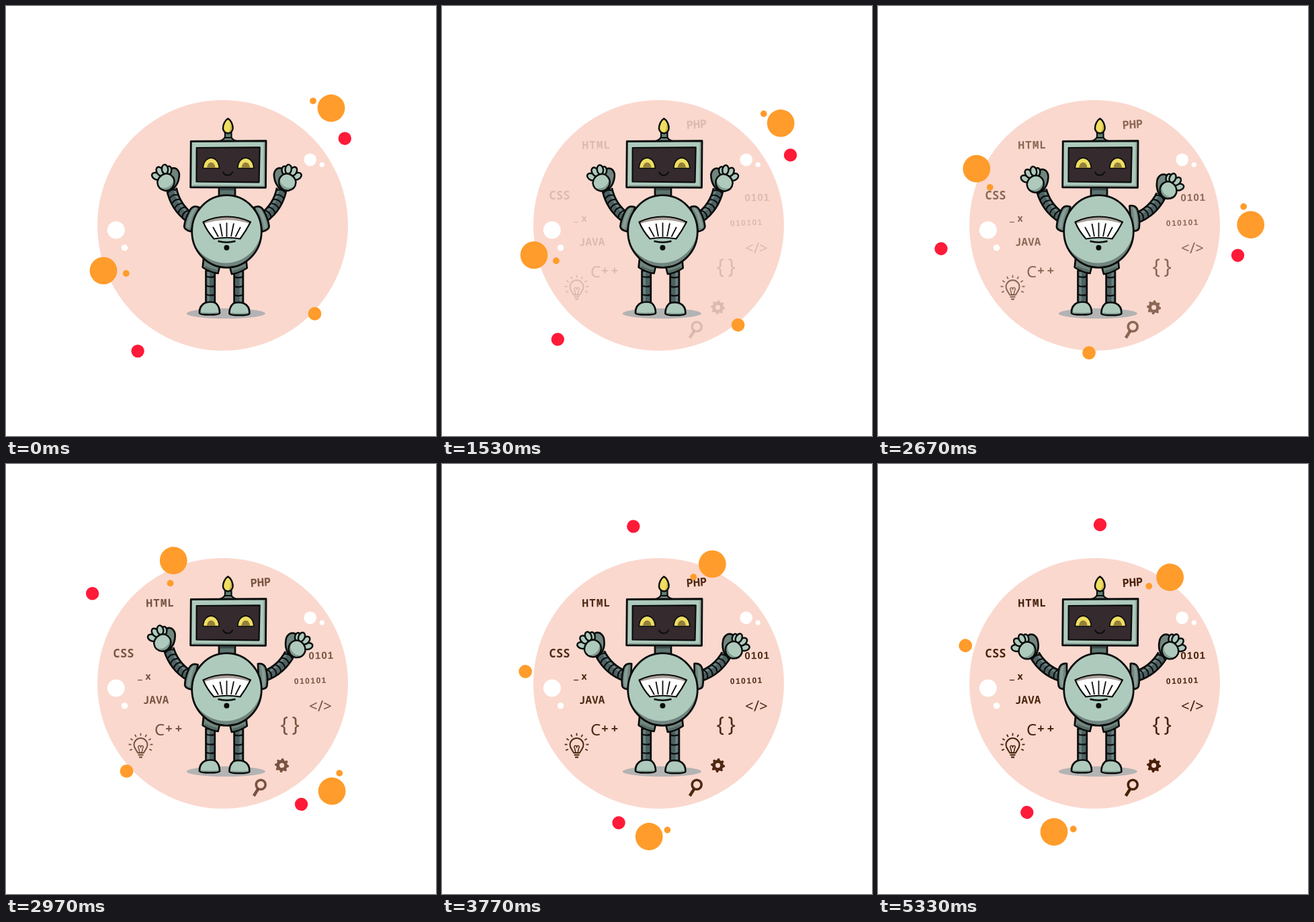
An HTML page with a canvas that plays this animation: 640 by 640 pixels, repeating every 6.01 s.

```html
<!DOCTYPE html>
<html lang="en">
<head>
<meta charset="utf-8">
<title>Waving robot</title>
<style>
html, body { margin: 0; width: 100%; height: 100%; overflow: hidden; background: #fff; }
canvas { display: block; width: 640px; height: 640px; }
</style>
</head>
<body>
<canvas id="stage" width="640" height="640"></canvas>
<script>
const ctx = document.getElementById('stage').getContext('2d');
const LOOP = 6010, END = 5330, TAU = Math.PI * 2, RAD = Math.PI / 180;
const INK = '#0b0d0c', MINT = '#aecabd', SHADE = '#71857f', SLATE = '#4d6163';
const ORANGE = '#ff9c2b', RED = '#ff1a38', BROWN = '#48200a', YELLOW = '#f0de62';

// Orbiting dots at rest: x, y, radius, colour
const DOTS = [
  [484, 152, 20.4, ORANGE], [457, 141.3, 4.9, ORANGE], [504.3, 197.2, 9.7, RED],
  [145, 393.8, 20.4, ORANGE], [178.8, 398, 4.9, ORANGE], [196.1, 513.6, 9.7, RED],
  [459.5, 458, 9.9, ORANGE]
];

// Words: text, left edge, baseline, font, letter spacing, tilt in degrees
const WORDS = [
  ['HTML', 208.5, 212.8, '600 16px "Noto Sans Mono", monospace', 1.1, -1],
  ['PHP', 364, 183.2, '600 17px "Noto Sans Mono", monospace', 0, -4],
  ['CSS', 159.5, 287.8, '600 17px "Noto Sans Mono", monospace', 0.2, 0],
  ['JAVA', 204, 357, '600 16px "Noto Sans Mono", monospace', 0, -1],
  ['0101', 450.5, 290.4, 'bold 15px "Liberation Sans", sans-serif', 1.1, -1],
  ['010101', 429, 327.5, 'bold 12px "Liberation Sans", sans-serif', 1.5, -2],
  ['C', 221, 403.8, '24px "Noto Sans", sans-serif', 0, 0],
  ['++', 237.2, 399.5, '600 18px "Noto Sans", sans-serif', 4.2, 0],
  ['_', 196, 319, '600 17px "Noto Sans", sans-serif', 0, 0],
  ['x', 207.5, 320.6, '700 14px "Noto Sans", sans-serif', 0, 0],
  ['</>', 451, 367.5, '500 22px "Noto Sans", sans-serif', 0.3, 0],
  ['{', 408.5, 397.5, '30px "Noto Sans", sans-serif', 0, 0],
  ['}', 425.5, 397.5, '30px "Noto Sans", sans-serif', 0, 0]
];

const clamp = v => Math.min(1, Math.max(0, v));
const smooth = s => s * s * (3 - 2 * s);

// Ease with control points (x1, 0) and (x2, 1)
function ease(x, x1, x2) {
  let lo = 0, hi = 1;
  for (let i = 0; i < 26; i++) {
    const s = (lo + hi) / 2, r = 1 - s;
    if (3 * s * r * r * x1 + 3 * s * s * r * x2 + s * s * s < x) lo = s; else hi = s;
  }
  return x >= 1 ? 1 : smooth(lo);
}

// 25 fps motion shown in 30 fps slots that start on whole 10 ms
function stepTime(ms) {
  const slot = Math.floor((Math.floor(ms / 10) * 10 + 3.4) * 0.03);
  return Math.ceil(slot * 5 / 6 - 0.5) * 40;
}

function paint(path, fill, width = 2.7) {
  if (fill) { ctx.fillStyle = fill; ctx.fill(path); }
  if (width) { ctx.strokeStyle = INK; ctx.lineWidth = width; ctx.stroke(path); }
}

const shape = (d, fill, width) => paint(new Path2D(d), fill, width);

function oval(x, y, rx, ry, fill, width = 0, tilt = 0) {
  const path = new Path2D();
  path.ellipse(x, y, rx, ry, tilt * RAD, 0, TAU);
  paint(path, fill, width);
}

function stroke(d, color, width) {
  ctx.strokeStyle = color;
  ctx.lineWidth = width;
  ctx.stroke(new Path2D(d));
}

// Draws a part reflected about the given vertical axis
function mirrored(axis, draw, dy = 0) {
  ctx.save();
  ctx.translate(2 * axis, dy);
  ctx.scale(-1, 1);
  draw();
  ctx.restore();
}

function backdrop() {
  oval(322.5, 326.5, 186.5, 186.5, '#fad8ce');
  oval(452.7, 228.8, 9.4, 9.4, '#fff');
  oval(470.3, 236.2, 3.6, 3.6, '#fff');
  oval(163.8, 333.5, 13, 13, '#fff');
  oval(176.5, 359.8, 4.8, 4.8, '#fff');
}

function bulbIcon() {
  stroke('M196 430C195 426 190.500 424 190.500 418A10 10 0 0 1 210.500 418C210.500 424 206 426 205 430Z', BROWN, 2);
  stroke('M196.500 433H204.500M198 436.300H203', BROWN, 2.2);
  stroke('M199 430L197.500 423A2 2 0 1 1 200.500 422A2 2 0 1 1 203.500 423L202 430', BROWN, 1.5);
  for (let i = 0; i < 9; i++) {
    const a = (155 + i * 28.75) * RAD, c = Math.cos(a), s = Math.sin(a);
    stroke(`M${200.5 + 14 * c} ${418.5 + 14 * s}L${200.5 + 18 * c} ${418.5 + 18 * s}`, BROWN, 1.7);
  }
}

function gearIcon() {
  const path = new Path2D();
  for (let i = 0; i < 32; i++) {
    const a = (i - 0.5) / 32 * TAU + 0.12, r = i % 4 < 2 ? 10.6 : 8.2;
    path.lineTo(410.6 + r * Math.cos(a), 448.6 + r * Math.sin(a));
  }
  path.closePath();
  path.moveTo(414.2, 448.6);
  path.arc(410.6, 448.6, 3.6, 0, TAU);
  ctx.fillStyle = BROWN;
  ctx.fill(path, 'evenodd');
}

function scribbles(alpha) {
  if (!alpha) return;
  ctx.save();
  ctx.globalAlpha = alpha;
  ctx.fillStyle = BROWN;
  for (const [text, x, y, font, spacing, tilt] of WORDS) {
    ctx.save();
    ctx.translate(x, y);
    ctx.rotate(tilt * RAD);
    ctx.font = font;
    ctx.letterSpacing = spacing + 'px';
    ctx.fillText(text, 0, 0);
    ctx.restore();
  }
  bulbIcon();
  gearIcon();
  stroke('M386.200 477.200A7 7 0 1 0 372.200 477.200A7 7 0 1 0 386.200 477.200', BROWN, 3.6);
  stroke('M375 484L368.800 494', BROWN, 4.4);
  ctx.restore();
}

function hand() {
  shape('M219 259Q225 252 231 254Q237 257 238 264Q240 274 236 282Q229 291 220 289Z', SHADE);
  oval(205.5, 274, 7, 4.8, MINT, 2.5, 9);
  oval(220, 260, 6.5, 4.3, MINT, 2.5, 81);
  oval(208.4, 265.4, 7.2, 4.8, MINT, 2.5, 39);
  oval(214.3, 260, 7, 4.6, MINT, 2.5, 64);
  const palm = new Path2D('M210 282Q208.500 275 213 269.500Q218 263.500 225 265Q234 268 234.500 277Q234 287 225 290Q214 291.500 210 282Z');
  ctx.save();
  ctx.clip(palm);
  paint(palm, '#809b8f', 0);
  oval(217, 273, 14.5, 14.5, MINT);
  ctx.restore();
  paint(palm, null, 2.5);
}

// Left arm in its lowered pose; raise turns it about the shoulder
function arm(raise) {
  ctx.save();
  ctx.translate(276, 318);
  ctx.rotate(raise * RAD);
  ctx.translate(-276, -318);
  const tube = 'M273 316Q247 308 233 284';
  stroke(tube, INK, 17.4);
  stroke(tube, SLATE, 12.2);
  stroke('M271 312Q250 304 238 284', '#6d8583', 3);
  for (let i = 0; i < 6; i++) {
    const t = 0.17 + i * 0.15, r = 1 - t;
    const x = r * r * 273 + 2 * r * t * 247 + t * t * 233;
    const y = r * r * 316 + 2 * r * t * 308 + t * t * 284;
    const dx = -26 * r - 14 * t, dy = -8 * r - 24 * t, n = 6.5 / Math.hypot(dx, dy);
    const px = dy * n, py = -dx * n;
    stroke(`M${x + px} ${y + py}Q${x + dx * 0.18} ${y + dy * 0.18} ${x - px} ${y - py}`, INK, 2.1);
  }
  shape('M281 297Q272 296 269.500 304Q266.500 319 269 331Q271 336 281 335Z', SHADE);
  shape('M277 299Q271 301 271 317Q271 327 273 332L277 331Q274 315 277 299Z', '#879f97', 0);
  hand();
  ctx.restore();
}

function leg() {
  shape('M297.500 394H310.800V443H297.500Z', SLATE);
  shape('M299.500 396H303V441H299.500Z', '#6a8280', 0);
  for (const y of [403, 417, 430]) stroke(`M297 ${y - 1}Q304 ${y + 2} 311 ${y - 0.5}`, INK, 2.4);
  shape('M288 457Q287.500 446 296 442Q305 439 312 442Q318 447 318 457Q317 459.500 303 459.500Q289 459.500 288 457Z', MINT);
  stroke('M290.500 456.500Q303 458 315.500 456.500', '#829d92', 1.6);
}

function hip() {
  shape('M294 376L292.700 389Q303 396 315.500 398L319 384Z', SHADE);
  stroke('M296 388Q305 392.500 314 394.500', '#536962', 3);
}

function eye(x) {
  shape(`M${x - 12} 241.500C${x - 11} 221 ${x + 11} 221 ${x + 12} 241.500Z`, YELLOW, 1.6);
  shape(`M${x - 6.2} 241C${x - 5.5} 230 ${x + 5.5} 230 ${x + 6.2} 241Z`, '#93803a', 0);
}

function head() {
  shape('M317 268H341V284H317Z', '#5c746f');
  stroke('M318 273H340', '#3d4d4b', 3);
  shape('M318 201Q324 199 326 195H335Q337 199 343 201Z', SHADE, 2.2);
  shape('M326 188H335.500V196H326Z', '#5c8177', 2.2);
  shape('M330.300 167.500C335 170 338.300 178 337.500 183Q336 189 330.500 189.500Q324.500 189 323 183C322.500 177 326 170 330.300 167.500Z', YELLOW, 2.5);
  stroke('M334.500 177Q336 183 332.500 187', '#c9b54c', 1.8);
  shape('M275.300 201.500L387 200.700L386.500 270.300L274.700 269.700Z', MINT, 2.9);
  stroke('M384.300 203L383.800 268L278 267.300', '#88a297', 1.5);
  shape('M283.700 211L377.700 210.300L376.500 262.300L283.500 261.500Z', '#352a2e', 2.2);
  eye(305.3);
  eye(356.8);
  stroke('M323 246.500Q324 251.500 330 252Q336 251.500 337.300 246.500', INK, 2);
}

function torso() {
  const body = new Path2D();
  body.ellipse(328.5, 335.5, 51.8, 53.8, 0, 0, TAU);
  ctx.save();
  ctx.clip(body);
  paint(body, SHADE, 0);
  oval(327, 327, 54, 55.5, MINT);
  ctx.restore();
  paint(body, null, 2.8);

  const gauge = new Path2D('M293.500 321.500Q310 313.500 329 313.500Q348 313.500 364 321.500Q357 335 348.500 346.500Q329 343 309.500 346.500Q299 335 293.500 321.500Z');
  ctx.save();
  ctx.clip(gauge);
  paint(gauge, '#fff', 0);
  stroke('M291 321.500Q310 315 329 315Q348 315 367 321.500', '#a79e98', 7);
  ctx.restore();
  paint(gauge, null, 2.2);
  stroke('M308 329L316 343.500M318.500 324L322 343M328.500 322.500V343.500M339 323.500L335 343M349 329L341.500 343.500', INK, 1.8);
  stroke('M315.500 350Q328.500 353.500 341.500 350', INK, 2.6);
  oval(328.4, 359.8, 4, 4, INK);
}

function robot(leftRaise, rightRaise) {
  oval(327.3, 457.7, 58.5, 7.6, '#b3b3b3');
  leg();
  mirrored(325.2, leg, 0.7);
  hip();
  mirrored(325.7, hip, 1);
  arm(leftRaise);
  mirrored(328.4, () => arm(rightRaise));
  head();
  torso();
}

function dots(angle) {
  ctx.save();
  ctx.translate(320, 320);
  ctx.rotate(angle * RAD);
  ctx.translate(-320, -320);
  for (const [x, y, r, color] of DOTS) oval(x, y, r, r, color);
  ctx.restore();
}

function render(ms) {
  ctx.fillStyle = '#fff';
  ctx.fillRect(0, 0, 640, 640);
  ctx.lineJoin = 'round';
  const t = stepTime(Math.min(ms, END));
  backdrop();
  scribbles(smooth(clamp((t - 600) / 3600)));
  robot(19 * (1 - ease(t / 4700, 1, 0.58)), 19 * (1 - ease(t / 5200, 0.86, 0)));
  dots(150 * ease(t / 5300, 0.911, 0.2025));
}

const start = performance.now();
function tick() {
  render((performance.now() - start) % LOOP);
  requestAnimationFrame(tick);
}
tick();
</script>
</body>
</html>
```
